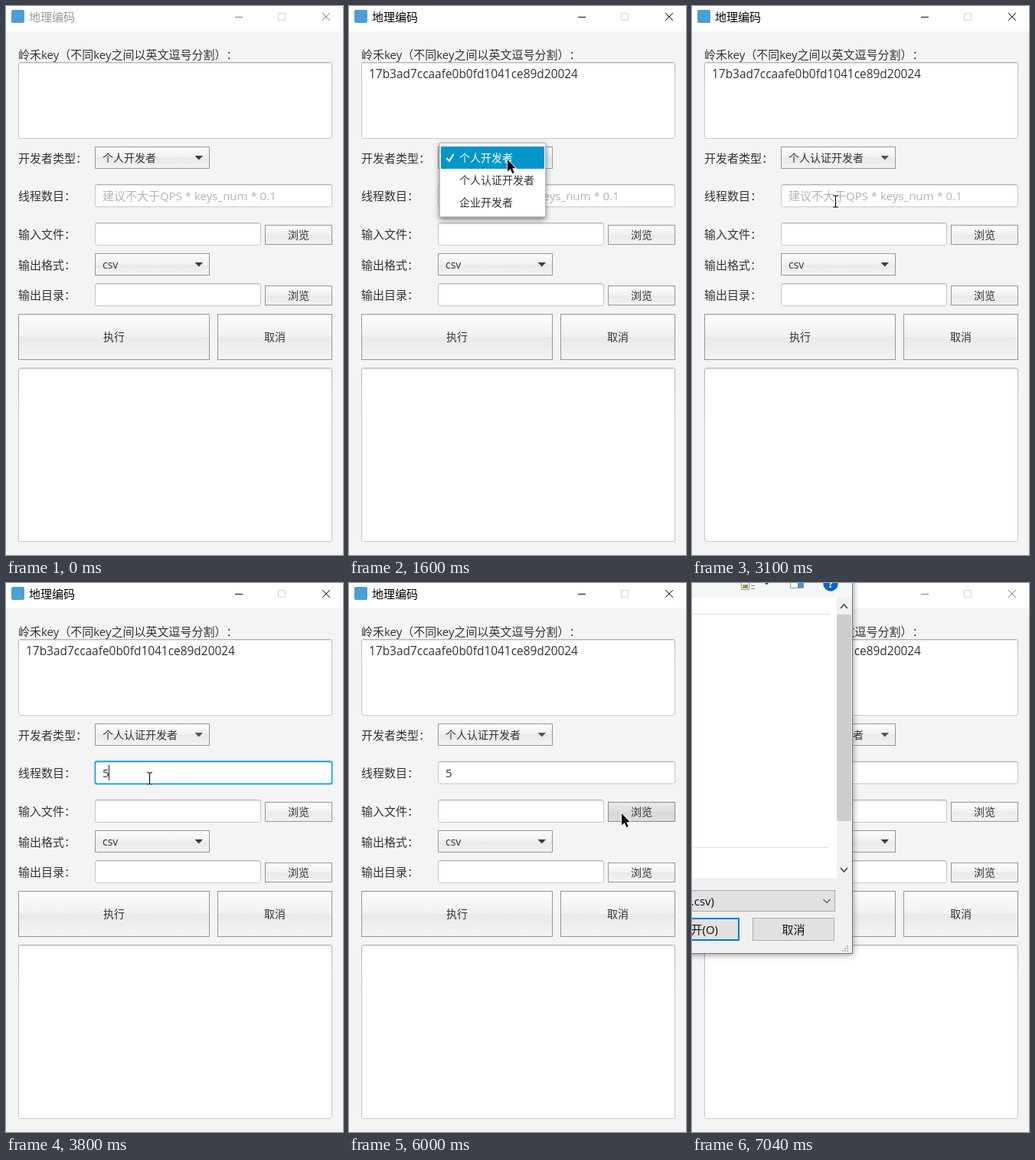
These frames come from a looping animation (440x715 px, 8 s). An HTML page:

```html
<!DOCTYPE html>
<html lang="zh-CN">
<head>
<meta charset="utf-8">
<title>地理编码</title>
<style>
html, body { margin: 0; width: 100%; height: 100%; overflow: hidden; background: #f4f4f4; }
svg { display: block; width: 440px; height: 715px; }
text {
  font: 15px "Open Sans", "Noto Sans CJK SC", "Noto Sans CJK", sans-serif;
  fill: #333; white-space: pre; text-spacing-trim: space-all;
}
.s { font-size: 14px; }
.key { font-size: 15.45px; }
.mid { text-anchor: middle; }
.end { text-anchor: end; }
.hint { fill: #b3b3b3; }
.ink { fill: #111; }
</style>
</head>
<body>
<svg id="stage" viewBox="0 0 440 715" xmlns="http://www.w3.org/2000/svg"></svg>
<script>
const LOOP = 8000;
const stage = document.getElementById('stage');

const rect = (x, y, w, h, fill, more = '') =>
  `<rect x="${x}" y="${y}" width="${w}" height="${h}" fill="${fill}" ${more}/>`;
const line = (d, color, width = 1) =>
  `<path d="${d}" fill="none" stroke="${color}" stroke-width="${width}"/>`;
const text = (x, y, s, cls = '', more = '') => `<text x="${x}" y="${y}" class="${cls}" ${more}>${s}</text>`;
const group = (id, body, more = '') => `<g id="${id}" ${more}>${body}</g>`;
const box = (x, y, w, h, fill, stroke) => rect(x + .5, y + .5, w - 1, h - 1, fill, `stroke="${stroke}"`);

// Text inputs: x, y, width, height
const fields = [
  [16, 73, 410, 100], [116, 232, 310, 30], [116, 282, 217, 30],
  [116, 361, 217, 30], [16, 471, 410, 227]
];
const field = ([x, y, w, h]) =>
  rect(x + .5, y + .5, w - 1, h - 1, '#fff', 'rx="2.5" stroke="url(#edge)"') +
  line(`M${x + 2} ${y + 1.5}h${w - 4}`, '#e4e4e4') + line(`M${x + 1} ${y + 2.5}h${w - 2}`, '#f6f6f6');
const ring = (id, [x, y, w, h]) => group(id,
  rect(x - .5, y - .5, w + 1, h + 1, 'none', 'rx="3" stroke="#039ed3" stroke-opacity=".22" stroke-width="1.8"') +
  rect(x + .5, y + .5, w - 1, h - 1, 'none', 'rx="2.5" stroke="#039ed3" stroke-width="1.4"'));

const button = (x, y, w, h, label) =>
  box(x, y, w, h, 'url(#face)', '#979797') +
  text(x + w / 2, y + h / 2 + 5.3, label, 's mid');
const combo = (y, id, label) =>
  box(116, y, 150, 29, 'url(#face)', '#979797') +
  text(126, y + 20, label, 's', `id="${id}"`) +
  `<path id="${id}Tip" d="M246.5 ${y + 12}h10.5l-5.2 5.5z" fill="#3c364b"/>`;

const defs = `<defs>
  <linearGradient id="face" x2="0" y2="1">
    <stop offset="0" stop-color="#fcfcfc"/><stop offset=".5" stop-color="#f1f1f1"/>
    <stop offset=".5" stop-color="#e9e9e9"/><stop offset="1" stop-color="#f3f3f3"/>
  </linearGradient>
  <linearGradient id="edge" x2="0" y2="1">
    <stop offset="0" stop-color="#b4b4b4"/><stop offset=".3" stop-color="#c8c8c8"/>
    <stop offset="1" stop-color="#c8c8c8"/>
  </linearGradient>
  <filter id="drop" x="-20%" y="-20%" width="140%" height="140%">
    <feDropShadow dx="0" dy="3" stdDeviation="3.5" flood-opacity=".5"/>
  </filter>
  <filter id="lift" x="-10%" y="-10%" width="120%" height="120%">
    <feDropShadow dx="0" dy="1" stdDeviation="4.5" flood-opacity=".45"/>
  </filter>
</defs>`;

const titleBar = rect(0, 0, 440, 33, '#fff') +
  rect(7, 5, 17, 17, '#4b9fd3', 'rx="2"') +
  text(30, 20, '地理编码', '', 'id="title"') +
  line('M355.5 9.5h9v9h-9z', '#d4d4d4') +
  `<path id="controls" d="M299 14.5h10M413 9l10 10M423 9l-10 10" fill="none"/>`;

const labels = [
  [69, '岭禾key（不同key之间以英文逗号分割）：'], [204, '开发者类型：'], [253, '线程数目：'],
  [303, '输入文件：'], [343, '输出格式：'], [382, '输出目录：']
].map(([y, s]) => text(16, y, s)).join('');

const form = labels + fields.map(field).join('') +
  combo(183, 'kind', '个人开发者') + combo(322, 'format', 'csv') +
  button(338, 285, 88, 26, '浏览') + button(338, 364, 88, 26, '浏览') +
  button(16, 401, 250, 60, '执行') + button(276, 401, 150, 60, '取消') +
  rect(338, 285, 88, 26, '#000', 'id="press" opacity=".08"') +
  text(126, 253, '建议不大于QPS * keys_num * 0.1', 'hint', 'id="hint"') +
  text(126, 253, '5', '', 'id="count"') +
  text(26, 94, '17b3ad7ccaafe0b0fd1041ce89d20024', 'key', 'id="key"') +
  ring('ringKey', fields[0]) + ring('ringCount', fields[1]) +
  rect(0, 0, 1, 20, '#222', 'id="caret"');

const items = ['个人开发者', '个人认证开发者', '企业开发者'];
const popup = group('popup',
  rect(118.5, 178.5, 138, 96, '#fff', 'stroke="#b8b8b8" filter="url(#drop)"') +
  rect(120, 183, 135, 29, '#0096c9', 'id="hover"') +
  items.map((s, i) => text(144, 203 + 29 * i, s, 's', `id="item${i}"`)).join('') +
  `<path id="tick" d="M127.5 198l3.5 4 5.5-9" fill="none" stroke-width="2"/>`);

const toolIcons =
  box(64, -5, 11, 14, '#fff', '#9a9a9a') + rect(66, 2, 7, 5, '#7d9c5d') + rect(66, 2, 3, 3, '#d9a441') +
  line('M77 3.5h5M77 7.5h5', '#8c8c8c') +
  '<path d="M94 -1h7l-3.5 3.5z" fill="#3b3456"/>' +
  box(128, -6, 18, 13, '#fff', '#8a9bb0') + rect(138, -5, 7, 11, '#4a90cf') +
  '<circle cx="181" cy="1" r="9.7" fill="#0a63c0"/>' +
  text(181, 6, '?', 'mid', 'style="fill:#fff;font-weight:700"');

const lower = (fill, edge) =>
  box(-300, 400, 487, 28, fill, '#adadad') + line('M171.5 412l4.5 4.5 4.5-4.5', '#555', 1.2) +
  text(29, 420, '(*.csv)', 'end ink') +
  box(-50, 436, 112, 30, fill, edge) + box(79, 436, 107, 30, fill, edge);

const grip = [[202, 472], [199, 475], [202, 475], [196, 478], [199, 478], [202, 478]]
  .map(([x, y]) => rect(x, y, 2, 2, '#bdbdbd')).join('');

const dialog = group('dialog',
  rect(-690, -60, 899.5, 542.5, '#f0f0f0', 'stroke="#777" filter="url(#lift)"') +
  group('early',
    rect(-300, -20, 403, 404, '#f8f8f8') + lower('#ececec', 'none') +
    rect(-50, 436, 112, 30, '#fff') + rect(79, 436, 24, 30, '#fff') +
    group('', toolIcons, 'transform="translate(-107 -5)"')) +
  group('late',
    rect(-300, -20, 509, 39, '#f5f6f7') + rect(-300, 19, 489, 365, '#fff') +
    line('M-300 40.5H180M-300 344.5H180', '#e2e2e2') +
    rect(189, 41, 19, 269, '#cdcdcd') +
    line('M194 33l4.5-5 4.5 5M194 371l4.5 5 4.5-5', '#505050', 1.8) +
    toolIcons + lower('#e1e1e1', '#adadad') +
    rect(-50, 437, 111, 28, 'none', 'stroke="#0078d7" stroke-width="2"') +
    text(34, 457, '打开(O)', 'end ink') + text(132.5, 457, '取消', 'mid ink') + grip));

const cursors =
  group('arrow', `<path d="M0 0V15.5L3.7 12.2 6.3 18 8.7 17 6.2 11.3H10.6Z" fill="#000"
    stroke="#fff" stroke-width="1.6" paint-order="stroke"/>`) +
  group('beam', line('M-3 -7.5h6M0 -7.5v15M-3 7.5h6', '#fff', 2.4) +
    line('M-3.5 -7.5h2.5l1 .8 1-.8h2.5M0 -7v14M-3.5 7.5h2.5l1-.8 1 .8h2.5', '#000', 1.1));

stage.innerHTML = defs + rect(0, 0, 440, 715, '#f4f4f4') + titleBar + form + popup + dialog + cursors;

const el = {};
stage.querySelectorAll('[id]').forEach(n => { el[n.id] = n; });
const show = (id, on) => { el[id].style.display = on ? '' : 'none'; };
const set = (id, name, value) => el[id].setAttribute(name, value);
const within = (t, a, b) => t >= a && t < b;

// Pointer moves: first step, last step, number of steps, end point
const moves = [
  [150, 640, 7, 187, 108], [1120, 1440, 5, 207, 200], [1760, 1920, 3, 204, 208],
  [2000, 2000, 1, 202, 216], [2160, 2160, 1, 202, 217], [2630, 2710, 2, 198, 209],
  [2860, 2940, 2, 189, 276], [3020, 3100, 2, 187, 254], [4340, 4660, 5, 175, 297],
  [5050, 5530, 7, 356, 300], [6330, 6490, 3, 377, 311]
];
const ease = p => p * p * (3 - 2 * p);

function pointer(t) {
  let x = 218, y = 690;
  for (const [a, b, n, px, py] of moves) {
    if (t < a) break;
    const step = n > 1 ? Math.min(n - 1, Math.floor((t - a) / (b - a) * (n - 1) + 1e-6)) : 0;
    const p = ease((step + 1) / n);
    x += (px - x) * p;
    y += (py - y) * p;
  }
  return [Math.round(x), Math.round(y)];
}

const blink = (t, from) => Math.max(0, Math.floor((t - from) / 490)) % 2 === 0;

function draw(t) {
  const active = within(t, 560, 6650);
  el.title.style.fill = active ? '#000' : '#999';
  set('controls', 'stroke', active ? '#111' : '#808080');

  const onKey = within(t, 560, 1520), onCount = within(t, 3180, 6000);
  show('ringKey', onKey);
  show('ringCount', onCount);
  show('key', t >= 960);
  show('hint', t < 3180);
  show('count', t >= 3800);
  show('press', within(t, 6000, 6080));

  show('caret', onKey ? blink(t, 960) : onCount && blink(t, 3840));
  set('caret', 'x', onKey ? (t < 960 ? 26 : 298) : t < 3800 ? 126 : 134);
  set('caret', 'y', onKey ? 78 : 237);

  const open = within(t, 1600, 2550), pick = t < 2000 ? 0 : 1;
  show('popup', open);
  set('hover', 'y', 183 + 29 * pick);
  items.forEach((s, i) => { el['item' + i].style.fill = i === pick ? '#fff' : '#333'; });
  set('tick', 'stroke', pick ? '#5a4a48' : '#fff');
  el.kind.textContent = items[t < 2550 ? 0 : 1];
  set('kindTip', 'fill', t < 2550 ? '#3c364b' : '#525157');

  show('dialog', t >= 6650);
  if (t >= 6650) {
    const a = [.18, .5, .82, 1][Math.min(3, Math.floor((t - 6650) / 80))];
    const s = 1 - .08 * (1 - a);
    set('dialog', 'opacity', a);
    set('dialog', 'transform', `translate(-241 257) scale(${s}) translate(241 -257)`);
    show('early', t < 6810);
    show('late', t >= 6810);
  }

  const [x, y] = pointer(t);
  const typing = !open && fields.some(([fx, fy, w, h]) => within(x, fx, fx + w) && within(y, fy, fy + h));
  const seen = within(t, 150, 6890);
  show('arrow', seen && !typing);
  show('beam', seen && typing);
  set('arrow', 'transform', `translate(${x} ${y})`);
  set('beam', 'transform', `translate(${x + .5} ${y + .5})`);
}

const start = performance.now();
function tick() {
  draw((performance.now() - start) % LOOP);
  requestAnimationFrame(tick);
}
tick();
</script>
</body>
</html>
```
